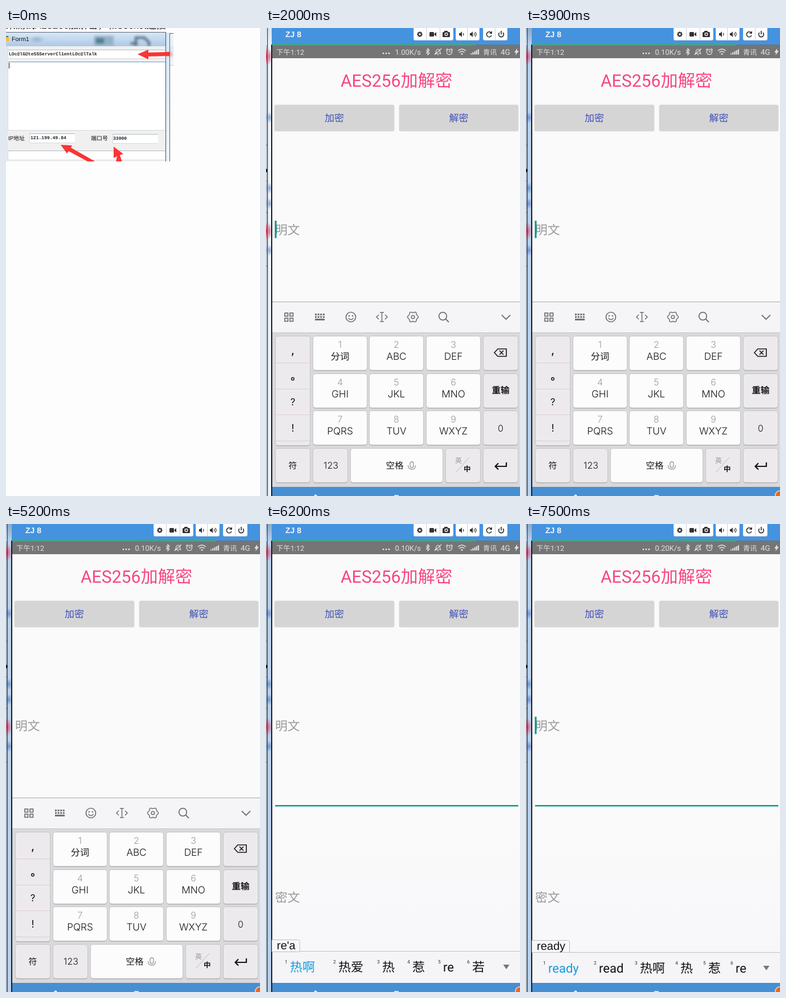
An HTML page with a canvas for the animation above (8 s loop, 446 by 821 pixels).

```html
<!DOCTYPE html>
<html lang="zh">
<head>
<meta charset="utf-8">
<style>
html, body { margin: 0; width: 446px; height: 821px; overflow: hidden; background: #fdfdfd; }
canvas { display: block; }
</style>
</head>
<body>
<canvas id="stage" width="446" height="821"></canvas>
<script>
const ctx = document.getElementById('stage').getContext('2d');
ctx.textRendering = 'geometricPrecision';
const LOOP = 8000;
const UI = 'Roboto, "Noto Sans CJK SC", "Noto Sans CJK", sans-serif';
const KEY = 'Inter, "Noto Sans CJK SC", "Noto Sans CJK", sans-serif';
const ARIAL = '"Liberation Sans", "Noto Sans CJK SC", sans-serif';
const MONO = '"Liberation Mono", monospace';
const TEAL = '#009688';

const BLINKS = [600, 1100, 1500, 2000, 2500, 2900, 3400, 3800, 4300, 4800, 5200, 5700, 6200, 6600, 7100, 7500];

// Input method states: start time, composition, candidates with their x
const TYPING = [
  { at: 5800, comp: '', words: [], xs: [] },
  { at: 5900, comp: 'r', words: ['人', '让', '如', '日', '热', '然'], xs: [42, 104, 158, 212, 266, 320] },
  { at: 6000, comp: 're', words: ['热', '惹', 're', '若', '人', '日'], xs: [42, 104, 158, 212, 266, 320] },
  { at: 6200, comp: "re'a", words: ['热啊', '热爱', '热', '惹', 're', '若'], xs: [42, 127, 204, 257, 311, 362] },
  { at: 7100, comp: 'read', words: ['read', 'ready', '热啊', '热', '惹', 're'], xs: [39, 117, 200, 271, 320, 368] },
  { at: 7200, comp: 'ready', words: ['ready', 'read', '热啊', '热', '惹', 're'], xs: [39, 128, 200, 271, 320, 368] }
];

function rect(x, y, w, h, color) {
  ctx.fillStyle = color;
  ctx.fillRect(x, y, w, h);
}

function round(x, y, w, h, r, color) {
  ctx.fillStyle = color;
  ctx.beginPath();
  ctx.roundRect(x, y, w, h, r);
  ctx.fill();
}

function text(str, x, y, size, color, font = UI, align = 'left', weight = 400) {
  ctx.font = `${weight} ${size}px ${font}`;
  ctx.textAlign = align;
  ctx.fillStyle = color;
  ctx.fillText(str, x, y);
}

function fill(d, color) {
  ctx.fillStyle = color;
  ctx.fill(new Path2D(d));
}

function line(d, color, width = 1.5) {
  ctx.strokeStyle = color;
  ctx.lineWidth = width;
  ctx.stroke(new Path2D(d));
}

function circle(x, y, r, color, width) {
  ctx.beginPath();
  ctx.arc(x, y, r, 0, Math.PI * 2);
  if (width) {
    ctx.strokeStyle = color;
    ctx.lineWidth = width;
    ctx.stroke();
  } else {
    ctx.fillStyle = color;
    ctx.fill();
  }
}

function blur(x, y, rx, ry, rgb, alpha) {
  ctx.save();
  ctx.translate(x, y);
  ctx.scale(rx, ry);
  const g = ctx.createRadialGradient(0, 0, 0, 0, 0, 1);
  g.addColorStop(0, `rgba(${rgb},${alpha})`);
  g.addColorStop(1, `rgba(${rgb},0)`);
  circle(0, 0, 1, g);
  ctx.restore();
}

function gradient(x, y, w, h, top, bottom) {
  const g = ctx.createLinearGradient(0, y, 0, y + h);
  g.addColorStop(0, top);
  g.addColorStop(1, bottom);
  rect(x, y, w, h, g);
}

function cog(x, y, r, teeth, depth) {
  ctx.beginPath();
  for (let i = 0; i < 72; i++) {
    const a = i * Math.PI / 36;
    const d = r * (1 - depth + depth * Math.cos(teeth * a));
    ctx.lineTo(x + d * Math.cos(a), y + d * Math.sin(a));
  }
  ctx.closePath();
}

function field(x, y, w, h, top = '#b3b9c0') {
  rect(x, y, w, h, '#d4dae0');
  rect(x + 1, y + 1, w - 1, h - 2, '#fff');
  rect(x, y, w, 1, top);
}

function drawForm() {
  const code = (str, x, y) => text(str, x, y, 8.07, '#222', MONO, 'left', 700);
  rect(0, 0, 446, 821, '#fdfdfd');
  text('(用来测试AES256加解密，和Socket连接', 281, 1, 17, '#111', UI, 'right');
  gradient(0, 7, 281, 25, '#d9e8f7', '#adc9e5');
  rect(0, 7, 281, 1, '#596570');
  blur(54, 20, 15, 7, '120,145,165', .5);
  ctx.filter = 'blur(2px)';
  rect(155, 14, 34, 18, '#94b1c9');
  rect(158, 18, 14, 9, '#527d8d');
  line('M228 32V17h15l8 8v7M219 27h12', '#5b7081', 4);
  ctx.filter = 'none';
  rect(0, 14, 5, 9, '#f3c22c');
  rect(0, 14, 4, 2, '#3d76b8');
  text('Form1', 10, 23, 10.6, '#111', ARIAL);
  rect(0, 32, 280, 202, '#f0f0f0');
  rect(0, 32, 3, 202, '#e2e8ef');
  field(3, 38, 277, 16);
  field(3, 59, 277, 121, '#6d9cc4');
  field(41, 185, 80, 17);
  field(187, 186, 80, 17);
  field(3, 215, 277, 17);
  code('LOc@lG@teSSServerCl1entLOc@lTalk', 5, 48);
  rect(5, 61, 1, 10, '#111');
  text('IP地址', 4, 197, 10, '#111');
  code('121.199.49.84', 43, 195);
  text('端口号', 149, 197, 10, '#111');
  code('33000', 188, 196);

  gradient(281, 8, 6, 226, '#d7e7f7', '#eef4fa');
  rect(280, 8, 1, 226, '#48515a');
  rect(288, 10, 6, 55, '#eaf1fa');
  gradient(288, 32, 6, 33, '#dce7f5', '#f2f6fb');
  rect(287, 9, 1, 225, '#59636d');
  rect(287, 9, 7, 1, '#59636d');
  rect(288, 65, 6, 1, '#bfcad5');
  blur(287, 46, 8, 7, '240,90,100', .6);
  ctx.save();
  ctx.beginPath();
  ctx.rect(0, 0, 294, 234);
  ctx.clip();
  fill('M231 46L250 38V43L287 42V49L250 50V55Z', '#fb3434');
  fill('M96 205L116 206L114 210L158 235H145L110 216L107 220Z', '#fb3434');
  fill('M189 208L206 221L200 223L204 235H193L195 225L189 228Z', '#fb3434');
  ctx.restore();
}

function drawEdge(active) {
  rect(0, 0, 11, 821, active ? '#b9d1ec' : '#eef2f6');
  rect(0, 0, 2, 821, active ? '#9aa5b2' : '#c2c8cf');
  gradient(0, 0, 10, 30, active ? '#8ea9c4' : '#d8e4ef', active ? '#b9d1ec' : '#eef2f6');
  ctx.save();
  ctx.beginPath();
  ctx.rect(0, 0, 10, 821);
  ctx.clip();
  for (const y of [50, 356]) blur(2, y, 9, 16, '220,25,70', active ? .65 : .9);
  for (const y of [157, 281, 308, 390]) blur(5, y, 7, 10, '65,110,185', .6);
  for (const y of [205, 268, 323, 417]) rect(0, y, 3, 1, '#596370');
  circle(0, 250, 3, '#111');
  ctx.restore();
  rect(2, 0, 1, 821, '#343940');
  if (!active) rect(3, 0, 1, 821, '#b4cbe2');
  rect(9, 29, 2, 792, '#171b20');
}

function drawHeader() {
  rect(10, 0, 436, 30, '#4593df');
  text('ZJ 8', 34, 16, 14, '#f3f8fd', ARIAL, 'left', 700);
  for (const [x, w] of [[259, 70], [333, 42], [381, 43]]) {
    round(x, -4, w, 26, 3, '#c3d3e2');
    round(x + .5, -4, w - 1, 25, 3, '#fff');
  }
  for (const x of [281, 305, 353, 402]) rect(x, 0, 1, 21, '#c9ccd0');
  const ink = '#333';
  cog(270, 11, 5, 8, .12);
  ctx.fillStyle = ink;
  ctx.fill();
  circle(270, 11, 1.8, '#fff');
  round(287, 7, 8, 8, 1.5, ink);
  fill('M295 11L299 7V15Z', ink);
  round(310, 7, 13, 9, 1.5, ink);
  rect(313, 5, 6, 3, ink);
  circle(316.5, 11, 3, '#fff');
  circle(316.5, 11, 1.7, ink);
  const speaker = x => fill(`M${x} 9h2l3-3v10l-3-3h-2Z`, ink);
  speaker(339);
  line('M346 9q2 2 0 4', ink, 1.2);
  speaker(358);
  line('M365 9q2 2 0 4M367 7q4 4 0 8', ink, 1.2);
  line('M395 8A4.5 4.5 0 1 0 396 13', ink, 1.7);
  fill('M397 5V10H392Z', ink);
  line('M410 8A4.4 4.4 0 1 0 416 8M413 5V11', ink, 1.7);
}

function drawStatus(speed) {
  rect(11, 30, 435, 23, '#757575');
  rect(11, 29, 435, 1, '#667582');
  rect(11, 29, 358, 2, '#3fb32c');
  const ink = '#e2e2e2';
  text('下午1:12', 18, 46.5, 12.5, ink);
  for (const x of [206, 211, 216]) circle(x, 44.5, 1.4, ink);
  text(speed, 272, 46.5, 13, ink, UI, 'right');
  line('M281 38.5L287 44L284 47V36L287 39L281 44.5', ink, 1.2);
  line('M297 45h10l-1.5-2v-3q-3.5-6-7 0v3ZM308 36L296 47M301 47h2', ink, 1.2);
  circle(322, 42, 4.6, ink, 1.3);
  line('M322 39V42H325M316 39L319 36M325 36L328 39', ink, 1.2);
  line('M337 40q7-6 14 0M339.5 43q4.5-4 9 0', ink, 1.6);
  circle(344, 45.5, 1.6, ink);
  for (let i = 0; i < 5; i++) rect(359 + i * 3.2, 44.5 - i * 1.8, 2.2, 2 + i * 1.8, ink);
  text('青讯', 381, 46.5, 12.2, ink);
  text('4G', 412, 46.5, 13.5, ink);
  fill('M441 36L436 43H439L438 48L444 40H441Z', ink);
}

function drawButton(x, w, label) {
  round(x - .5, 134.5, w + 1, 47, 3.5, '#dddbdc');
  round(x, 135, w, 45.5, 3, '#d6d5d6');
  text(label, x + w / 2, 164, 17, '#3f51b5', UI, 'center', 500);
}

function drawKey(x, y, w, h, color) {
  round(x - .5, y - .5, w + 1, h + 2, 4.5, '#b4b1b5');
  round(x, y, w, h, 4, color);
}

function drawToolbar() {
  rect(11, 480, 435, 55, '#f5f4f7');
  rect(11, 480, 435, 1, '#aaa8ac');
  const ink = '#707074';
  ctx.strokeStyle = ink;
  ctx.lineWidth = 1.7;
  for (const x of [33, 42]) for (const y of [500, 509]) ctx.strokeRect(x, y, 5.5, 5.5);
  for (let r = 0; r < 2; r++) for (let c = 0; c < 4; c++) rect(86 + c * 4.6, 501 + r * 4.5, 3, 3, ink);
  rect(86, 510, 17, 3, ink);
  circle(149, 507, 8.5, ink, 1.7);
  circle(146, 505, 1.3, ink);
  circle(152, 505, 1.3, ink);
  line('M144.5 509q4.5 5 9 0', ink);
  line('M198 503L194 507L198 511M209 503L213 507L209 511M200 499h7M203.5 499V515M200 515h7', ink);
  cog(258, 507, 9.5, 6, .1);
  ctx.strokeStyle = ink;
  ctx.lineWidth = 1.5;
  ctx.stroke();
  circle(258, 507, 2.8, ink, 1.5);
  circle(310.5, 505.5, 6.8, ink, 1.8);
  line('M315.5 510.5L321 516', ink, 1.8);
  line('M414 503.5L421.5 511L429 503.5', ink, 1.8);
}

function drawKeyboard() {
  drawToolbar();
  rect(11, 534, 435, 271, '#d9d8da');
  rect(11, 534, 435, 1, '#c8c6ca');
  const soft = '#edeaee', ink = '#151515', gray = '#999';
  const label = (s, x, y, size = 16, weight = 400) => text(s, x, y, size, ink, KEY, 'center', weight);
  const rowY = row => Math.round(541 + row * 65.7);

  drawKey(17, 541, 60, 191, soft);
  for (const y of [587, 633, 678, 724]) rect(17, y, 60, 1, '#dccbd1');
  label(',', 47, 572, 18, 600);
  circle(47, 615.5, 2.3, ink, 1.4);
  label('?', 47, 662, 17);
  label('!', 47, 708, 18);

  const names = ['分词', 'ABC', 'DEF', 'GHI', 'JKL', 'MNO', 'PQRS', 'TUV', 'WXYZ'];
  names.forEach((name, i) => {
    const x = Math.floor(83 + i % 3 * 99.6), y = rowY(Math.floor(i / 3));
    drawKey(x, y, 94, 59, '#fcfcfc');
    text(i + 1, x + 47, y + 20, 16, gray, KEY, 'center', 300);
    if (i) label(name, x + 47, y + 41, 17.2, 300);
    else label(name, x + 47, y + 41, 16.2);
  });

  for (let i = 0; i < 3; i++) drawKey(382, rowY(i), 60, 59, soft);
  line('M401 569.5L407 563H422V576H407ZM410 566L417 573M417 566L410 573', ink, 1.6);
  label('重输', 412, 641, 15.5, 600);
  label('0', 412, 708, 16, 300);

  for (const [x, w] of [[17, 60], [83, 60], [149, 161], [316, 60], [382, 60]]) {
    drawKey(x, 738, w, 59, w > 99 ? '#fcfcfc' : soft);
  }
  label('符', 47, 773, 15);
  label('123', 114, 773, 16, 300);
  label('空格', 226, 773, 15.5, 500);
  ctx.lineWidth = 1.3;
  ctx.strokeStyle = gray;
  ctx.beginPath();
  ctx.roundRect(253, 761, 6, 10, 3);
  ctx.stroke();
  line('M249.5 767q0 7 6.5 7q6.5 0 6.5-7', gray, 1.3);
  text('英', 332, 763, 12, gray);
  line('M334 779L357 753', '#bbb', 1);
  text('中', 347, 778, 12.5, ink, UI, 'left', 600);
  line('M422 762V769H403M408 763.5L402.5 769L408 774.5', ink, 2.2);
}

function drawCandidates(state, drop) {
  gradient(11, 535, 435, 270, '#fafafa', '#f7f7fb');
  rect(16, 493, 427, 2.5, '#0b9a8c');
  text('密文', 16, 663, 21.8, '#999');
  if (!state.comp) return;
  const top = 749 + drop;
  rect(11, top, 435, 805 - top, '#f5f5f8');
  rect(11, top, 435, 1, '#bfbfc3');
  ctx.font = `20px ${ARIAL}`;
  ctx.textAlign = 'left';
  const w = ctx.measureText(state.comp).width + 16;
  ctx.lineWidth = 1;
  ctx.strokeStyle = '#bcbcc0';
  ctx.fillStyle = '#f8f8fa';
  ctx.beginPath();
  ctx.roundRect(10.5, 729.5 + drop / 2, w, 21, [0, 3, 0, 0]);
  ctx.fill();
  ctx.stroke();
  text(state.comp, 19, 746 + drop / 2, 20, '#111', ARIAL);
  state.words.forEach((word, i) => {
    const x = state.xs[i];
    text(i + 1, x - 9, 771 + drop, 8.5, '#333');
    text(word, x, 785 + drop, 22, i ? '#111' : '#159bdc');
  });
  fill(`M416.5 ${773 + drop}H427.5L422 ${781 + drop}Z`, '#777');
}

function drawPhone(t) {
  const active = t >= 3800;
  const speed = t < 3300 ? '1.00K/s' : t < 7000 ? '0.10K/s' : '0.20K/s';
  rect(0, 0, 446, 821, '#fafafa');
  drawEdge(active);
  drawHeader();
  drawStatus(speed);
  text('AES256加解密', 229, 102.5, 30.2, '#f84583', UI, 'center');
  drawButton(15, 210, '加密');
  drawButton(234, 209, '解密');
  text('明文', 16, 362, 21.8, '#999');
  if (BLINKS.filter(b => b <= t).length % 2 === 0) rect(15.5, 338, 3, 30.5, TEAL);

  const state = TYPING.findLast(s => s.at <= t);
  if (state) drawCandidates(state, t >= 6300 ? 2 : 0);
  else drawKeyboard();

  rect(11, 805, 435, 16, '#468fd2');
  circle(87, 821, 2.5, '#fff');
  round(225, 819.5, 8, 3, 1, '#fff');
  if (active) {
    circle(446, 820, 9, '#f5d9c8');
    circle(446, 820, 7.5, '#f1641e');
  }
}

function frame(now) {
  const t = now % LOOP;
  if (t < 300) drawForm();
  else drawPhone(t);
  requestAnimationFrame(frame);
}
requestAnimationFrame(frame);
</script>
</body>
</html>
```
